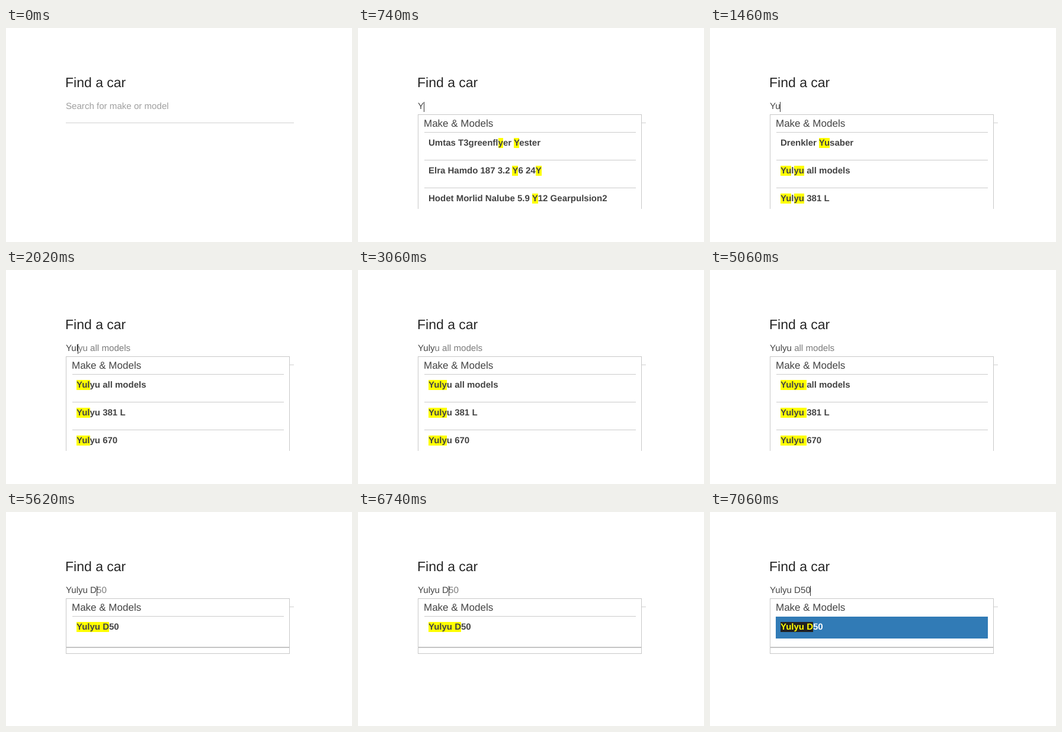
These frames come from a looping animation (584x362 px, 7380 ms). An HTML page:

```html
<!DOCTYPE html>
<html lang="en">
<head>
<meta charset="utf-8">
<title>Car search</title>
<style>
  html, body { margin: 0; width: 100%; height: 100%; overflow: hidden; background: #fff; }
  body {
    position: relative;
    font: 15px/17px "Liberation Sans", Arial, sans-serif;
    text-rendering: geometricPrecision;
    white-space: pre;
    color: #444;
  }
  body *:not(span):not(mark) { position: absolute; box-sizing: border-box; margin: 0; }

  h1 { left: 100px; top: 79px; font-size: 23px; line-height: 26px; font-weight: 400; color: #262626; }
  #field { left: 101px; top: 124px; font-size: 15.1px; }
  .hint { color: #7c7c7c; }
  .empty { color: #a0a0a0; }
  .caret { position: relative; }
  .caret::after {
    content: ""; position: absolute; left: -0.5px; top: 1px;
    width: 1px; height: 17px; background: #333;
  }
  #rule { left: 101px; top: 160px; width: 385px; height: 1px; background: #d0d0d0; }

  #menu {
    left: 101px; top: 146px; width: 378px; height: 160px;
    overflow: hidden; background: #fff;
    border: 1px solid #c8c8c8; border-bottom: 0;
  }
  #menu.short { height: 94px; border-bottom: 1px solid #c8c8c8; }
  #menu.short::after {
    content: ""; position: absolute; left: 0; right: 0; top: 81px;
    height: 2px; background: #c4c4c4;
  }
  h2 { left: 9px; top: 5px; font-size: 17px; line-height: 20px; font-weight: 400; }
  .row {
    left: 9px; width: 358px; height: 37px; padding: 10px 0 0 8px;
    font-weight: 700; color: #434343;
  }
  .row::before {
    content: ""; position: absolute; left: 1px; right: 0; top: 0;
    height: 1px; background: #cbcbcb;
  }
  mark { background: #ff0; color: inherit; }
  .picked { background: linear-gradient(#fff 1px, #317bb6 1px); color: #fff; height: 38px; }
  .picked::before { display: none; }
  .picked mark { background: #222; color: #ff0; }
</style>
</head>
<body>
<h1>Find a car</h1>
<div id="rule"></div>
<div id="field"></div>
<div id="menu"><h2>Make &amp; Models</h2><div id="rows"></div></div>
<script>
  const LOOP = 7380;
  const cars = [
    "Umtas T3greenflyer Yester",
    "Elra Hamdo 187 3.2 Y6 24Y",
    "Hodet Morlid Nalube 5.9 Y12 Gearpulsion2",
    "Drenkler Yusaber",
    "Yulyu all models",
    "Yulyu 381 L",
    "Yulyu 670",
    "Yulyu D50"
  ];

  // start time, typed text, caret visible, suggestion accepted
  const steps = [
    [0, "", false],
    [100, "", true],
    [740, "Y", true],
    [1140, "Y", false],
    [1460, "Yu", true],
    [1860, "Yu", false],
    [2020, "Yul", true],
    [2500, "Yuly", true],
    [3060, "Yuly", false],
    [3540, "Yuly", true],
    [3780, "Yulyu", true],
    [4340, "Yulyu", false],
    [4660, "Yulyu ", true],
    [5060, "Yulyu ", false],
    [5620, "Yulyu D", true],
    [6100, "Yulyu D", false],
    [6740, "Yulyu D", true],
    [7060, "Yulyu D", true, true]
  ];

  const $ = id => document.getElementById(id);
  const span = (cls, text) => `<span class="${cls}">${text}</span>`;

  function render([, query, caret, picked]) {
    const pattern = new RegExp(query, "gi");
    const found = query ? cars.filter(c => c.search(pattern) >= 0).slice(0, 3) : [];
    const rest = query && found[0].startsWith(query) ? found[0].slice(query.length) : "";
    const cursor = caret ? span("caret", "") : "";

    $("field").innerHTML = !query
      ? cursor + span("empty", "Search for make or model")
      : picked ? found[0] + cursor
      : query + cursor + span("hint", rest);

    $("menu").hidden = !query;
    $("menu").style.display = query ? "" : "none";
    $("menu").className = found.length < 3 ? "short" : "";
    $("rows").innerHTML = found.map((car, i) =>
      `<div class="row${picked ? " picked" : ""}" style="top:${29 + i * 47}px">` +
      car.replace(pattern, "<mark>$&</mark>") + "</div>").join("");
  }

  let shown;
  function tick() {
    const t = performance.now() % LOOP;
    const step = steps.filter(s => s[0] <= t).pop();
    if (step !== shown) render(shown = step);
    requestAnimationFrame(tick);
  }
  tick();
</script>
</body>
</html>
```
